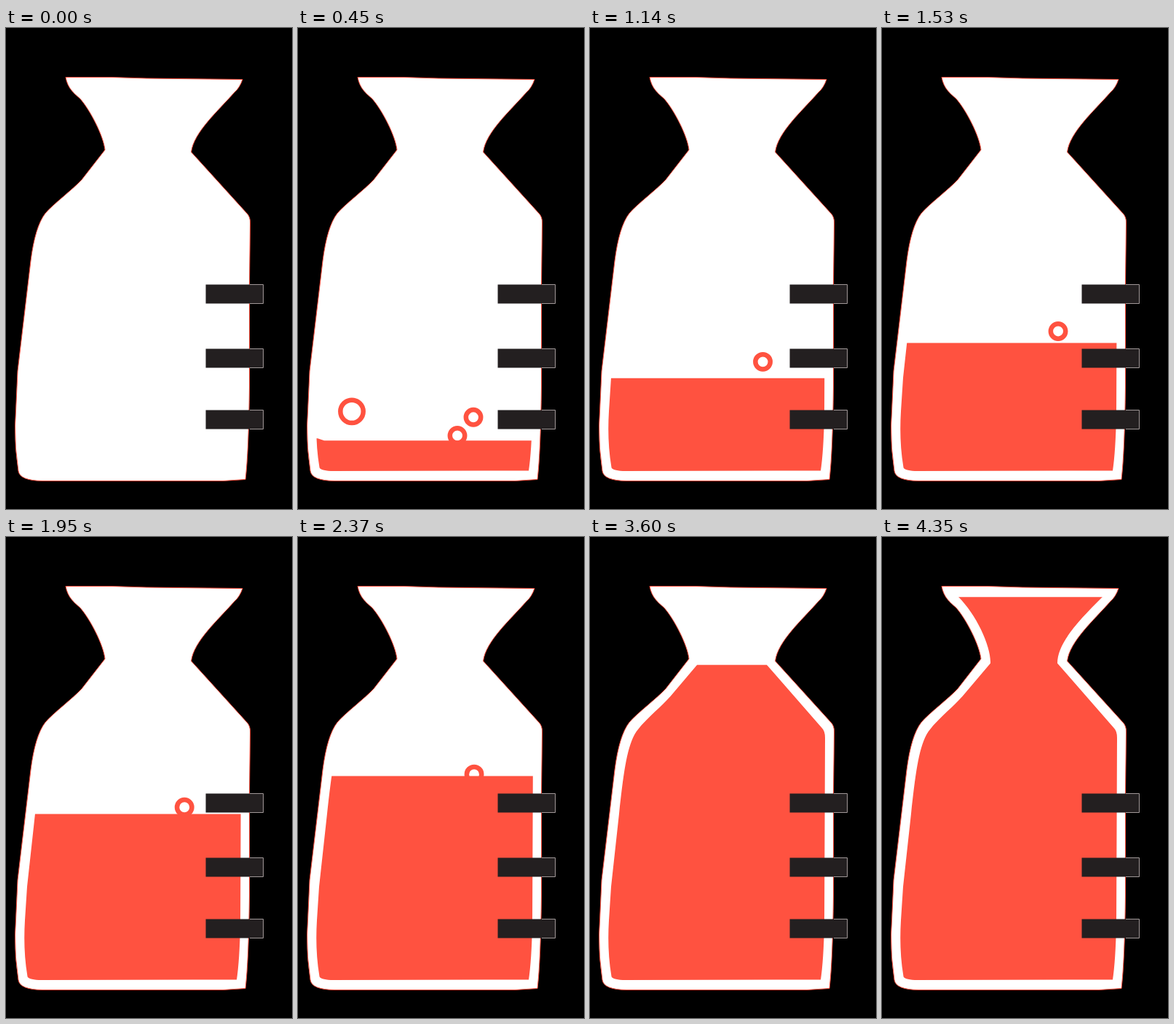
An HTML page for the animation above (4380 ms loop, 393x659 px).

```html
<!DOCTYPE html>
<html lang="en">
<head>
<meta charset="utf-8">
<title>Filling bottle</title>
<style>
  html, body { margin: 0; width: 100%; height: 100%; overflow: hidden; background: #000; }
  svg { display: block; }
</style>
</head>
<body>
<svg width="393" height="659" viewBox="0 0 393 659">
  <clipPath id="inside">
    <path d="M105 82H303C270 115 241 145 241 173L319 262Q323 266 323 275L322 530Q321 580 317 606.500L45 607Q30 606 29.500 602C25 575 24.500 550 26 525L29 479L40 379C46 325 50 292 61 271C71 253 100 232 115 213L149 173C150 150 130 107 105 82Z"/>
  </clipPath>
  <path fill="#fff" stroke="#ff5240" d="M82 67.500H145L193 69L325 70.500Q321 82 314 88C290 115 258 143 254.500 170L331 254Q336 259 335.500 268L334.500 350V490Q333.500 580 329 618.500L298 620.500H50Q19 620 17 607Q12 575 12.500 545Q14 515 16 470L34 319Q40 272 54 254C64 242 92 221 104 208L136 167C134 148 116 113 102 97C93 89 85 83 82 67.500Z"/>
  <g clip-path="url(#inside)" fill="none" stroke="#ff5240" stroke-width="6.5">
    <g id="bubbles"></g>
    <path id="liquid" fill="#ff5240" stroke="none"/>
  </g>
  <g id="marks"></g>
</svg>
<script>
const LOOP = 4380, STEP = 30, START = 120;
const $ = id => document.getElementById(id);

// y: starting depth, speed: px per ms after the first burst, top: height where it pops
const bubbles = [
  { r: 15.7, x: 74, y: 631, speed: 0.18, top: 487, sway: 0 },
  { r: 10.2, x: 241, y: 615, speed: 0.1075, top: 310, sway: 4.2 },
  { r: 10.2, x: 219, y: 640, speed: 0.107, top: 510, sway: 0 }
];

$('bubbles').innerHTML = bubbles.map(b => `<circle r="${b.r}"/>`).join('');
$('marks').innerHTML = [351, 439, 523].map(y =>
  `<path fill="#231f20" d="M274.500 ${y + .5}h79v26h-79z"/>
   <path fill="none" stroke="#a09898" d="M335 ${y + .5}h18.500v26H335"/>`).join('');

function drawBubble(b, dot, t) {
  const age = t - START;
  const burst = 48 * (1 - Math.exp(-age / 100));
  const y = b.y - b.speed * age - burst;
  const x = b.x - b.sway * Math.sin((t - 450) * Math.PI / 1000);
  dot.setAttribute('visibility', age >= 0 && y > b.top ? 'visible' : 'hidden');
  dot.setAttribute('transform', `translate(${x} ${y})`);
}

function draw(now) {
  const t = Math.floor(now % LOOP / STEP) * STEP;
  const level = t < START ? 620 : 606 - (t - START) * 0.1238;
  const tip = level > 540 ? 3 : 0;
  $('liquid').setAttribute('d', `M0 ${level - tip}H27L36 ${level}H393V620H0Z`);
  bubbles.forEach((b, i) => drawBubble(b, $('bubbles').children[i], t));
}

const begin = performance.now();
function tick() {
  draw(performance.now() - begin);
  requestAnimationFrame(tick);
}
tick();
</script>
</body>
</html>
```
